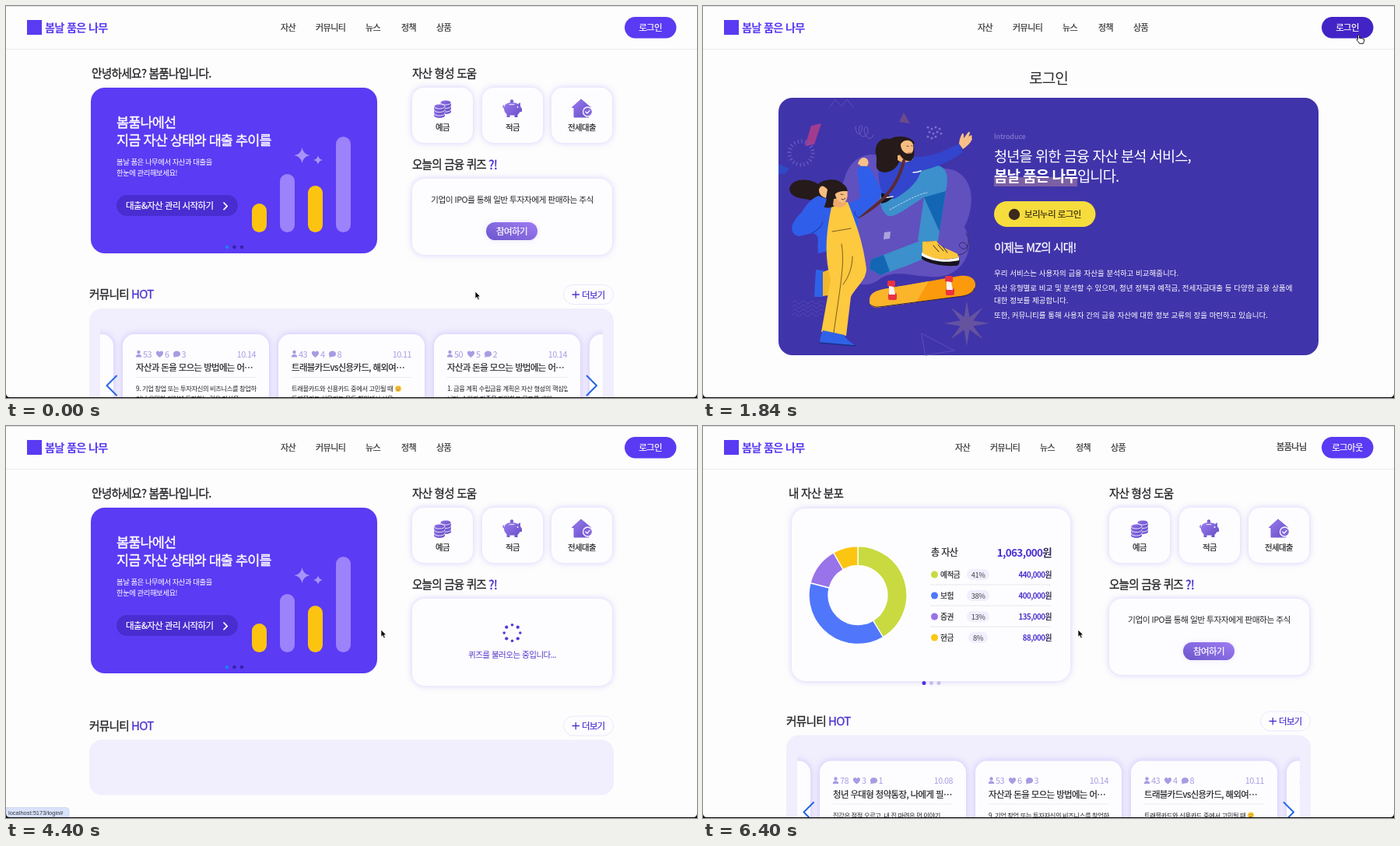
Animation, 888 px wide and 504 px high, one loop 6.48 s. Source, as an HTML page:

```html
<!DOCTYPE html>
<html lang="ko">
<head>
<meta charset="utf-8">
<title>봄날 품은 나무</title>
<style>
html,body{margin:0;width:100%;height:100%;overflow:hidden;background:#000}
svg{display:block}
#stage{width:100vw;height:100vh}
text{font-family:"Noto Sans CJK KR","Noto Sans CJK",sans-serif;letter-spacing:-.05em;white-space:pre}
.m{stroke-width:.02em}
.b{font-weight:700}
.l{font-weight:300}
.w{letter-spacing:0}
.u{font-family:"Liberation Sans",sans-serif;letter-spacing:0}
.glow{filter:drop-shadow(0 0 4px rgba(110,80,245,.28))}
.soft{filter:drop-shadow(0 0 3px rgba(110,80,245,.16))}
</style>
</head>
<body>
<svg id="stage" viewBox="0 0 888 504" preserveAspectRatio="none"></svg>
<script>
const LOOP = 6480, STEP = 80;
const INK = '#242428', VIO = '#5a3af2', DEEP = '#4b30cf', LILAC = '#a99be2';

const text = (x, y, size, str, fill = INK, cls = 'm', anchor = 'start') =>
  `<text x="${x}" y="${y}" font-size="${size}" fill="${fill}" class="${cls}" text-anchor="${anchor}"` +
  `${cls.includes('m') ? ` stroke="${fill}"` : ''}>${str}</text>`;
const mid = (x, y, size, str, fill, cls) => text(x, y, size, str, fill, cls, 'middle');
const box = (x, y, w, h, r, fill, more = '') =>
  `<rect x="${x}" y="${y}" width="${w}" height="${h}" rx="${r}" fill="${fill}" ${more}/>`;
const dot = (x, y, r, fill) => `<circle cx="${x}" cy="${y}" r="${r}" fill="${fill}"/>`;
const shape = (d, fill, more = '') => `<path d="${d}" fill="${fill}" ${more}/>`;
const line = (d, color, w = 1, more = '') =>
  `<path d="${d}" fill="none" stroke="${color}" stroke-width="${w}" stroke-linecap="round" stroke-linejoin="round" ${more}/>`;
const group = (id, body, more = '') => `<g id="${id}" ${more}>${body}</g>`;
const repeat = (n, f) => Array.from({ length: n }, (_, i) => f(i)).join('');

function star(cx, cy, R, r, n, fill) {
  const p = [];
  for (let i = 0; i < 2 * n; i++) {
    const a = i * Math.PI / n, q = i % 2 ? r : R;
    p.push((cx + q * Math.sin(a)).toFixed(1) + ',' + (cy - q * Math.cos(a)).toFixed(1));
  }
  return `<polygon points="${p.join(' ')}" fill="${fill}"/>`;
}

// ---- header
const navItems = [[353, '자산'], [398, '커뮤니티'], [462, '뉴스'], [508, '정책'], [553, '상품']];
const header =
  box(0, 0, 888, 1, 0, '#dcdcdf') + box(0, 55, 888, 1, 0, '#ececef') +
  box(27, 18, 19, 19, 0, VIO) + text(50, 33, 14.2, '봄날 품은 나무', VIO, 'b') +
  group('nav', navItems.map(([x, s]) => text(x, 32, 11, s, '#333')).join('')) +
  box(795, 14, 66.5, 27.5, 13.7, VIO, 'id="btn"') +
  group('signIn', mid(828, 32, 11.4, '로그인', '#fff')) +
  group('signOut', mid(828, 32, 11.4, '로그아웃', '#fff') + text(737, 31, 11.1, '봄품나님'));

// ---- home
const bars = [[316, 254, '#fcc410'], [352, 216, '#9c82fb'], [388, 231, '#fcc410'], [424, 168, '#9c82fb']];
const spark = (x, y, r) =>
  shape(`M${x} ${y - r}Q${x + r * .15} ${y - r * .15} ${x + r} ${y}Q${x + r * .15} ${y + r * .15} ${x} ${y + r}` +
    `Q${x - r * .15} ${y + r * .15} ${x - r} ${y}Q${x - r * .15} ${y - r * .15} ${x} ${y - r}Z`, '#a893fb');
const banner =
  text(110, 92, 14.7, '안녕하세요? 봄품나입니다.') +
  box(109, 105, 368, 213, 18, '#5b3bf3') +
  text(142, 156, 17.5, '봄품나에선', '#fff') +
  text(142, 178.5, 17.5, '지금 자산 상태와 대출 추이를', '#fff') +
  text(142, 204, 9.4, '봄날 품은 나무에서 자산과 대출을', '#fff', '') +
  text(142, 218, 9.4, '한눈에 관리해보세요!', '#fff', '') +
  box(142, 243, 156, 27, 13.5, '#4a2dd0', 'class="soft"') +
  text(154, 261, 11.5, '대출&amp;자산 관리 시작하기', '#fff') +
  line('M280 253l4.2 4.3l-4.2 4.3', '#fff', 1.7) +
  bars.map(([x, y, c]) => box(x, y, 19, 291 - y, 9.5, c)).join('') +
  spark(380.5, 192, 10) + spark(401, 198, 6) +
  dot(284, 310, 2.3, '#1f7df5') + dot(293.5, 310, 2.3, '#3a20ac') + dot(303, 310, 2.3, '#3a20ac');

const coin = (x, y) =>
  shape(`M${x - 7} ${y}v3a7 3 0 0 0 14 0v-3z`, 'url(#vg)') +
  `<ellipse cx="${x}" cy="${y}" rx="7" ry="3" fill="url(#vg)" stroke="#fff" stroke-width=".8"/>`;
const coins = coin(565, 133) + coin(565, 128.5) + coin(565, 124) + coin(557, 138) + coin(557, 133.5) + coin(557, 129);
const pig =
  dot(650, 122.5, 2.2, '#7c60d6') +
  shape('M640 132c0-6 5-8 10-8c4 0 6 1 8 2l3-2v5l2 3v4h-2.500c-1 2-2 3-3 3.500v3.500h-4v-2.500h-6v2.500h-4v-4c-2-1.500-3.500-4-3.500-7z', 'url(#vg)') +
  line('M640.500 131c-2 0-2-2-1-3', '#7c60d6', 1.2) + dot(657.5, 130, .9, '#fff') + line('M647 126.600h6', '#fff', .9);
const house =
  shape('M739 120l12.500 10.500h-2.500v12.500h-19v-12.500h-2.500z', 'url(#vg)', 'stroke="#7c60d6" stroke-linejoin="round"') +
  `<circle cx="747.500" cy="136" r="6" fill="#8468dd" stroke="#fdfdff" stroke-width="1.300"/>` +
  line('M744.800 136l2 2l3.400-3.800', '#fff', 1.2);

const side =
  text(522, 92, 14.5, '자산 형성 도움') +
  [[522, '예금'], [612, '적금'], [701, '전세대출']].map(([x, s]) =>
    box(x, 105, 78, 71, 15, '#fdfdff', 'class="glow"') + mid(x + 39, 160, 10.4, s)).join('') +
  coins + pig + house +
  text(522, 209, 14.5, '오늘의 금융 퀴즈') + text(620, 209.5, 16, '?!', DEEP);

const quiz =
  box(522, 222, 257, 98, 16, '#fdfdff', 'class="glow"') +
  mid(650.5, 252.5, 10.75, '기업이 IPO를 통해 일반 투자자에게 판매하는 주식', INK, '') +
  box(617, 278, 66, 23, 11.5, 'url(#hg)', 'class="soft"') + mid(650, 293.5, 11.5, '참여하기', '#fff');

const wait =
  box(522, 222, 257, 112, 16, '#fdfdff', 'class="glow"') +
  group('spin', repeat(8, i => {
    const a = i * Math.PI / 4;
    return dot(10.3 * Math.cos(a), 10.3 * Math.sin(a), i % 2 ? 2.1 : 1.8, '#5636d8');
  })) +
  mid(650.5, 298, 10.55, '퀴즈를 불러오는 중입니다...', '#5636c8', '') +
  box(107, 403.5, 674, 71, 16, '#f1eefd');

// ---- community, laid out for the shortest page and shifted down when needed
const posts = [
  [78, 3, 1, '10.08', '청년 우대형 청약통장, 나에게 필…', '집값은 점점 오르고, 내 집 마련은 먼 이야기', ''],
  [53, 6, 3, '10.14', '자산과 돈을 모으는 방법에는 어…', '9. 기업 창업 또는 투자자신의 비즈니스를 창업하', '거나 유망한 기업에 투자하는 것은 자산을'],
  [43, 4, 8, '10.11', '트래블카드vs신용카드, 해외여…', '트래블카드와 신용카드 중에서 고민될 때', '트래블카드 신용카드 모두 해외에서 사용'],
  [50, 5, 2, '10.14', '자산과 돈을 모으는 방법에는 어…', '1. 금융 계획 수립금융 계획은 자산 형성의 핵심입', '니다. 수입과 지출을 파악하고 목표를 세워']
];
const counts = ([a, b, c]) =>
  dot(20.5, 23, 2.2, LILAC) + shape('M16.700 29.500c0-5 7.600-5 7.600 0z', LILAC) +
  text(26, 29.5, 11, a, LILAC, '') +
  shape('M47.500 30c-7-5-4.500-8.800-2.200-8.600c1.200 0 1.900.8 2.200 1.500c.3-.7 1-1.500 2.200-1.500c2.300-.2 4.800 3.600-2.200 8.600z', LILAC) +
  text(54, 29.5, 11, b, LILAC, '') +
  `<ellipse cx="69.500" cy="25.300" rx="4.600" ry="3.800" fill="${LILAC}"/>` + shape('M65.500 26v4l4-1.500z', LILAC) +
  text(75.5, 29.5, 11, c, LILAC, '');
const post = (p, x) => `<g transform="translate(${x} 422)">` +
  box(0, 0, 188, 130, 15, '#fdfdff', 'class="glow"') + counts(p) +
  text(171, 29.5, 10.8, p[3], LILAC, '', 'end') +
  text(17, 47, 11.4, p[4]) +
  line('M17 55.500H171', '#dcdce4', .7, 'stroke-dasharray="1 1.500"') +
  `<svg x="17" y="60" width="155" height="40">${text(0, 13, 8.3, p[5], INK, '')}${text(0, 26, 8.3, p[6], INK, '')}` +
  (p[0] === 43 ? dot(137, 10, 4, '#fcc63a') + dot(135.6, 9, .6, '#543') + dot(138.4, 9, .6, '#543') + line('M135.500 12l2.500-.5', '#543', .7) : '') +
  '</svg></g>';
const slides = first =>
  box(107, 389, 674, 180, 16, '#f1eefd') +
  `<svg x="121" y="405" width="646" height="150" viewBox="121 405 646 150">` +
  repeat(5, i => post(posts[(i + first + 3) % 4], 200 * i - 50)) + '</svg>' +
  line('M142 475.500l-12.500 12.500l12.500 12.500', '#2566e6', 2) + line('M746.500 475.500l12.500 12.500l-12.500 12.500', '#2566e6', 2);
const community =
  text(107, 376, 14.7, '커뮤니티') + text(161, 376, 15, 'HOT', DEEP) +
  box(716.5, 358.5, 64, 25, 12.5, '#fdfdff', 'stroke="#ece8fa"') +
  line('M728 371h8.500M732.200 366.800v8.500', DEEP, 1.3) + text(740, 375.5, 11.4, '더보기', DEEP);

// ---- signed-in asset card
const parts = [
  ['예적금', 41, '440,000', '#c8da40'], ['보험', 38, '400,000', '#5077fb'],
  ['증권', 13, '135,000', '#9873e9'], ['현금', 8, '88,000', '#fcc511']
];
const won = (y, size, n) => text(448, y, size, `${n}<tspan fill="#33305c">원</tspan>`, DEEP, 'b', 'end');
const assets =
  text(110, 92, 14.6, '내 자산 분포') +
  box(114, 106, 358, 222, 18, '#fdfdff', 'class="glow"') +
  group('ring', parts.map(p => `<path fill="${p[3]}" stroke="#fff" stroke-width="1.300" stroke-linejoin="round"/>`).join('')) +
  text(293, 167, 12, '총 자산') + won(168, 13.5, '1,063,000') +
  parts.map(([name, pct, sum, color], i) => {
    const y = 191 + 27 * i, w = pct > 9 ? 29 : 25;
    return dot(297.5, y, 4.5, color) + text(305, y + 4, 9.7, name) +
      box(353.5 - w / 2, y - 7, w, 14, 7, '#f1eefd') + mid(353.5, y + 3.5, 9.4, pct + '%', '#444', '') +
      won(y + 4, 9.7, sum) +
      (i < 3 ? line(`M293 ${y + 13}H448`, '#cfcfd8', .7, 'stroke-dasharray="1.500 1.800"') : '');
  }).join('') +
  dot(284, 330.5, 2.5, '#5132d8') + dot(293.5, 330.5, 2.5, '#c8bdf3') + dot(303, 330.5, 2.5, '#c8bdf3');

// ---- login
const faint = '#6a5dc4', skin = '#f7bd80', hairTone = '#261a1a', denim = '#3c90cb', blue = '#2f5eea';
const backdrop =
  shape('M182 222C190 188 226 182 244 204C266 226 296 202 322 211C349 222 350 256 336 284C352 312 334 346 302 348C272 350 246 336 226 352C198 372 168 340 176 304C160 272 172 246 182 222Z', '#6151bf') +
  shape('M139 154L152 151L143 178L131 180Z', '#a23c8e') +
  `<circle cx="126" cy="189" r="15" fill="none" stroke="${faint}" stroke-width="5" stroke-dasharray="1.200 3.510"/>` +
  line('M196 155c0 10 6 14 8 4c2-9-6-6-3 4c3 9 12 4 11-4c-1-7-7-3-4 5c3 8 9 8 11 2', faint, 1) +
  shape('M252 149L258 137L266 151Z', '#6b4b8c') +
  repeat(11, i => dot(290 + (i % 4) * 5 + (i >> 2) % 2 * 2 - 1, 156 + (i >> 2) * 6 + i % 2 * 2, 1.5, '#7c70d2')) +
  line('M163 130l7-10l8 9l7-9l8 10', '#5b4dba', 1) +
  shape('M97 203l14 6l-6 7h-8z', '#3049c6') +
  repeat(4, i => line(`M115 ${381 + i * 5.3}q2.800-4 5.600 0t5.600 0t5.600 0t5.600 0t5.600 0t5.600 0t5.600 0`, '#5749b5', 1)) +
  star(339, 408, 29, 9, 8, '#6553a0') +
  line('M281 421L323 443L286 449Z', '#5b4dbc', 1) +
  shape('M233 291l8-1l-1 9l-8 1z', '#aaa4dd');

const board =
  shape('M214 379C214 368 224 366 232 364L330 347C345 345 353 353 349 363C346 373 332 373 318 375L230 387C218 389 214 386 214 379Z', '#fb9a0c') +
  shape('M214 379C214 368 224 366 232 364L290 354L274 381L230 387C218 389 214 386 214 379Z', '#fcb42b') +
  line('M215 384c5 4 10 3 15 2.500L318 375c14-2 26-1 31-12', '#2b2140', 1) +
  [[242, 365], [316, 359]].map(([x, y]) =>
    box(x - 5, y - 12, 10, 8, 2, '#ea3340') + box(x - 4, y + 4, 11, 9, 2, '#ea3340') +
    shape(`M${x - 3} ${y - 5}l6 1l2 10l-8 0z`, '#f4f4fa')).join('');

const backFigure =
  // rear leg, then the raised knee
  shape('M216 326L284 300L300 318L262 334L228 346L214 338Z', denim) +
  shape('M216 326L232 320L240 341L228 346L214 338Z', '#1266b4') +
  shape('M228 240C246 224 278 206 300 205C314 206 316 220 312 238L302 302L276 302L284 246C264 258 248 272 238 270C228 264 226 250 228 240Z', denim) +
  shape('M284 246L312 238L304 290Z', '#1266b4') +
  line('M240 262C258 252 276 242 288 240', '#dfefff', .8, 'stroke-dasharray="2 2"') +
  shape('M282 303l18-1c4 8 14 10 26 16c4 4 4 9 2 12c-14 3-34 0-46-11z', '#fcc63c') +
  shape('M281 318c12 8 28 10 48 5c2 6 0 11-4 11c-18 1-36-3-44-9z', '#17131f') +
  shape('M281 317c14 9 30 11 48 6v4c-18 4-36 1-48-6z', '#fff') +
  line('M296 308l7 8m-1-9l7 8m-1-6l6 8', '#2b2140', 1) +
  line('M328 320c16-2 14-14 6-16c-8 0-4 10 3 8c6-4 5-14 1-20', '#2b2140', .8) +
  // jacket and reaching arm
  shape('M226 206C236 196 258 192 276 194C296 194 314 184 329 177L334 188C318 200 298 208 280 212C276 228 260 240 246 248L230 246C228 232 224 220 226 206Z', '#3245cc') +
  shape('M229 240l15 6c-4 4-9 7-15 8z', '#17131f') +
  line('M230 247l14-2M270 214c4 0 8-1 10-2', '#f4f4fa', 1.4) +
  shape('M329 177c1-7 2-9 4-13c3-1 2 4 2 6l6-8c3-1 2 3 0 6c4-3 6-2 4 1c3 1-2 9-11 15z', '#f8c088') +
  // head: hair behind, beard, face
  shape('M272 176C266 166 248 166 240 171C228 168 220 178 222 190C226 200 216 212 234 214C248 212 250 204 254 198Z', hairTone) +
  shape('M250 192l18-3l2 8c-8 5-15 5-20 1z', '#f3b274') +
  shape('M251 182c2-8 17-10 20-2c1 8 1 16-4 19c-9 2-16-7-16-17z', hairTone) +
  shape('M254 178c3-7 14-7 16 0c1 6 0 10-3 12c-8 1-13-5-13-12z', skin) +
  line('M262 180l2 .4m4-.6l1 .2m-5 9q2 1 4 0', '#5a2a20', .9) +
  line('M258 199C252 226 236 252 198 272', '#5b2a33', 4);

const frontFigure =
  // bent rear leg
  shape('M145 339L155 340L154 374L143 374Z', '#2f62e6') +
  shape('M154 342L200 324L208 348L190 368L154 373Z', '#f2b82c') +
  // raised fist and sleeve, jacket body
  shape('M199 203c2-8 8-10 12-6c3 4 2 9-4 11z', '#f8c088') +
  shape('M198 210C204 203 212 206 216 210L230 238C230 250 208 264 200 272L197 308L186 318L182 254C192 252 198 250 202 246Z', blue) +
  shape('M124 268C136 254 152 252 172 256L166 314L148 318C146 302 152 294 140 292L124 296C110 294 112 280 124 268Z', blue) +
  line('M140 292c8-4 12-8 14-14M200 272c-3-1-5-4-5-8', '#1f3db0', 1.1) +
  // overalls
  shape('M166 254L186 252C196 278 206 304 210 338C210 352 196 362 190 374L184 424L152 419L164 352C154 316 160 282 166 254Z', '#fdc93f') +
  line('M178 306C182 330 178 350 168 420M192 322C192 334 188 348 180 358M166 290l24-4', '#6d4f1e', .9) +
  shape('M154 417l28 6c0 4 6 8 14 14l-46-4c0-6 2-10 4-16z', '#2f62e6') +
  line('M150 433l46 4', '#1c2f88', 1.3) +
  // head
  shape('M182 232C176 220 156 222 148 229C134 220 112 222 111 236C114 250 134 246 146 252C156 264 172 260 174 250Z', hairTone) +
  shape('M168 248l14-2l2 9c-6 5-12 5-17 1z', '#f0ab6c') +
  shape('M169 236c4-6 14-5 16 0c2 8 0 16-5 17c-7 0-11-8-11-17z', skin) +
  shape('M186 238C184 226 172 225 164 232L168 244C172 238 178 238 186 238Z', hairTone) +
  line('M177 242l3 .4m-2 6q2 2 5-1', '#5a2a20', .9) +
  shape('M160 236c-5-6-9-6-11 0c0 6 3 9 9 11z', skin) +
  shape('M122 276C128 260 138 248 148 244L159 248C156 262 146 278 138 290Z', blue);

const login =
  mid(444, 100, 19.2, '로그인', '#2c2c30', 'l') +
  box(97, 118, 694, 331, 18, '#4034aa') +
  group('art', backdrop + backFigure + board + frontFigure) +
  text(374, 170.5, 9, 'Introduce', '#8479d2', 'm w') +
  text(374, 200, 18.65, '청년을 위한 금융 자산 분석 서비스,', '#fff', 'l') +
  box(374, 220, 107, 12, 0, '#7c60a4') +
  text(374, 226, 18.9, '봄날 품은 나무', '#fff', 'b') + text(481, 226, 18.8, '입니다.', '#fff', 'l') +
  box(374, 251, 130.5, 33, 16.5, '#f6dc3d', 'id="talk"') +
  group('talkIcon', dot(400, 268, 7.2, '#3a2a1e')) +
  text(413, 272, 11.5, '보리누리 로그인', '#3a2e14') +
  text(374, 315.5, 14.5, '이제는 MZ의 시대!', '#fff') +
  [[347, '우리 서비스는 사용자의 금융 자산을 분석하고 비교해줍니다.'],
   [366, '자산 유형별로 비교 및 분석할 수 있으며, 청년 정책과 예적금, 전세자금대출 등 다양한 금융 상품에'],
   [381.5, '대한 정보를 제공합니다.'],
   [401, '또한, 커뮤니티를 통해 사용자 간의 금융 자산에 대한 정보 교류의 장을 마련하고 있습니다.']
  ].map(([y, s]) => text(374, y, 9.5, s, '#fff', 'w')).join('');

const overlay =
  group('status', shape('M0 490.500H77q4 0 4 4V504H0Z', '#d8e2f9', 'stroke="#c3cde6" stroke-width=".6"') +
    text(3, 499.5, 7.5, 'localhost:5173/login#', '#33373f', 'u')) +
  shape('M0 498q0 5 5 5H883q5 0 5-5V504H0Z', '#0b0b0d') +
  group('arrow', shape('M0 0v9.200l2.100-1.900l1.500 3.400l1.700-.8l-1.500-3.200h2.900z', '#000', 'stroke="#fff" stroke-width=".7"')) +
  group('hand', shape('M-1 .8q1-1.500 2 0v3.200q3-.5 6 1.500v3q-1 1-1 2.500h-5q-1-2.500-3.500-4.500q0-1.700 1.500-.9z', '#fff', 'stroke="#000" stroke-width=".9" stroke-linejoin="round"'));

const stage = document.getElementById('stage');
stage.innerHTML =
  `<defs><linearGradient id="vg" x2="1" y2="1"><stop stop-color="#9a7cf0"/><stop offset="1" stop-color="#654bc4"/></linearGradient>
  <linearGradient id="hg" y1="1" x2="1" y2="0"><stop stop-color="#6a56cc"/><stop offset="1" stop-color="#a07cf2"/></linearGradient></defs>` +
  box(0, 0, 888, 504, 0, '#fdfdfd') + header +
  group('home', side + group('banner', banner) + group('assets', assets) + group('quiz', quiz) + group('wait', wait) +
    group('comm', community + group('slidesA', slides(1)) + group('slidesB', slides(0)))) +
  group('login', login) + overlay;

const el = {};
stage.querySelectorAll('[id]').forEach(e => el[e.id] = e);
const show = (id, on) => el[id].style.display = on ? '' : 'none';
const move = (id, x, y, more = '') => el[id].setAttribute('transform', `translate(${x} ${y})${more}`);
const inside = ([x, y], l, t, w, h) => x >= l && x <= l + w && y >= t && y <= t + h;

// pointer stops: time, x, y
const stops = [[240, 603, 367], [1040, 843, 33], [1760, 843, 33], [2560, 826, 185], [2640, 826, 185], [3440, 482, 262]];
function pointer(t) {
  const i = stops.findIndex(s => s[0] > t);
  if (i === 0) return stops[0].slice(1);
  if (i < 0) return stops[stops.length - 1].slice(1);
  const [t0, x0, y0] = stops[i - 1], [t1, x1, y1] = stops[i];
  const k = (t - t0) / (t1 - t0), e = k * k * (3 - 2 * k);
  return [x0 + (x1 - x0) * e, y0 + (y1 - y0) * e];
}

function drawRing(progress) {
  const sums = [440, 400, 135, 88], cx = 199, cy = 217.5, R = 63, r = 38;
  const at = (q, a) => `${cx + q * Math.sin(a)} ${cy - q * Math.cos(a)}`;
  let a = 0;
  sums.forEach((v, i) => {
    const b = a + v / 1063 * 2 * Math.PI * progress;
    el.ring.children[i].setAttribute('d',
      `M${at(R, a)}A${R} ${R} 0 0 1 ${at(R, b)}L${at(r, b)}A${r} ${r} 0 0 0 ${at(r, a)}Z`);
    a = b;
  });
}

function render(t) {
  const onLogin = t >= 1200 && t < 4320, loading = t >= 4320 && t < 4800, member = t >= 5120;
  const p = pointer(t);
  const overBtn = inside(p, 795, 14, 66, 27), overTalk = onLogin && inside(p, 374, 251, 130, 33);

  show('home', !onLogin); show('login', onLogin);
  show('banner', !member); show('assets', member);
  show('quiz', !loading); show('wait', loading);
  show('slidesA', t < 1200); show('slidesB', t >= 4800);
  move('comm', 0, loading ? 14.5 : member ? 8.5 : 0);
  move('nav', member ? -29 : 0, 0);
  show('signIn', !member); show('signOut', member);
  show('art', t >= 1520); show('talkIcon', t >= 1520);

  el.btn.setAttribute('fill', overBtn ? '#4224c6' : VIO);
  el.talk.setAttribute('fill', overTalk ? '#c5a70d' : '#f6dc3d');
  show('status', t >= 3520 && t < 4720);
  move('spin', 650.5, 266, ` rotate(${(t - 4400) * .36})`);
  drawRing(1 - Math.pow(1 - Math.min(1, Math.max(0, (t - 5130) / 1000)), 4));

  const hand = overBtn || overTalk;
  show('hand', hand); show('arrow', !hand);
  move(hand ? 'hand' : 'arrow', p[0], p[1]);
}

function tick() {
  render(Math.floor(performance.now() % LOOP / STEP) * STEP);
  requestAnimationFrame(tick);
}
tick();
</script>
</body>
</html>
```
